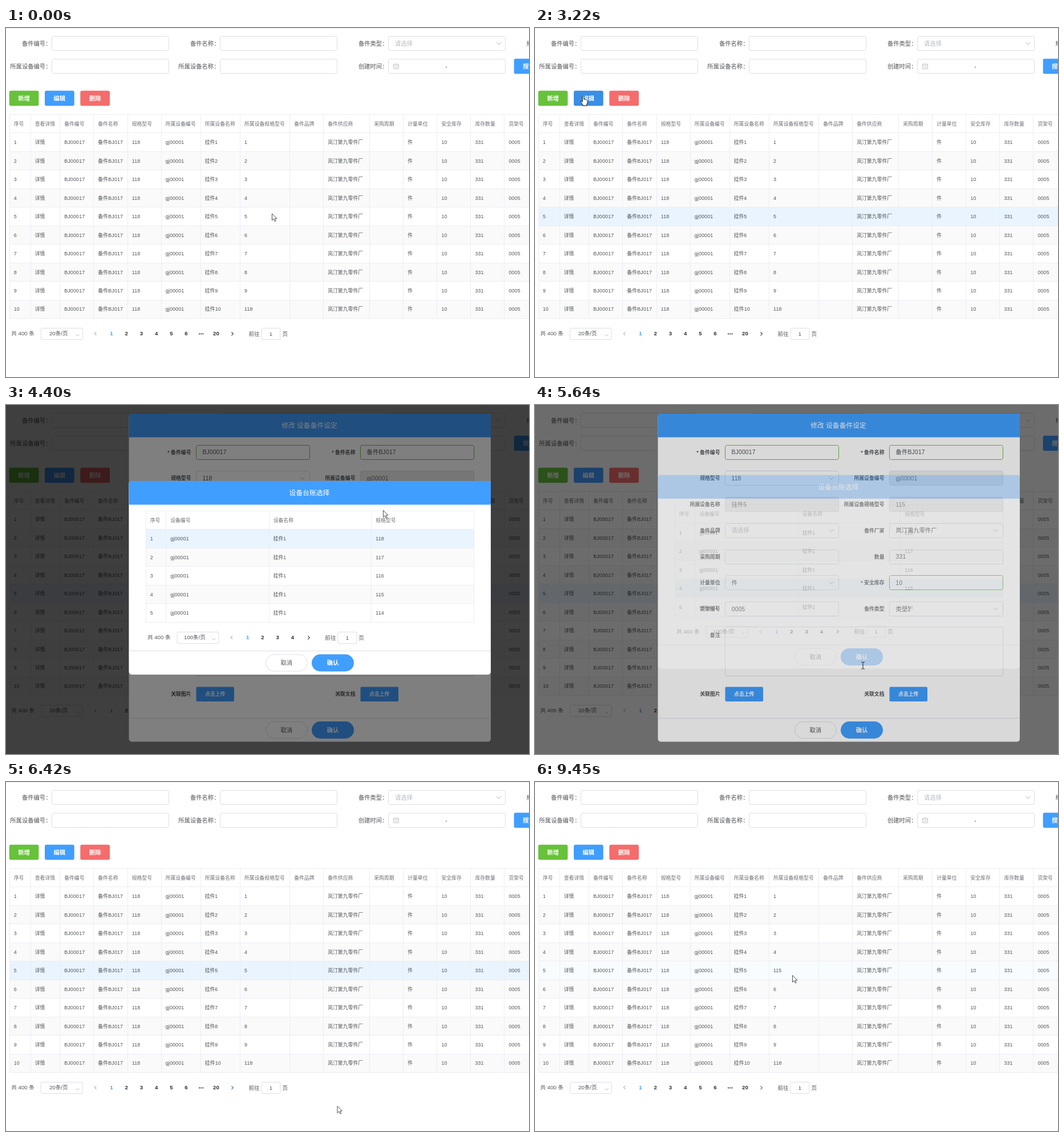
Write an HTML page that moves like this. It is 917 by 611 pixels and loops after 9830 ms.

```html
<!DOCTYPE html>
<html lang="zh-CN">
<head>
<meta charset="utf-8">
<style>
html, body { margin: 0; width: 100%; height: 100%; overflow: hidden; background: #fff; }
svg { display: block; width: 917px; height: 611px; font-family: "Liberation Sans", "Noto Sans CJK SC", "Noto Sans CJK", sans-serif; }
text { white-space: pre; }
</style>
</head>
<body>
<svg id="stage" viewBox="0 0 917 611"></svg>
<script>
const LOOP = 9830;
const BLUE = '#409eff', GREEN = '#67c23a', RED = '#f56c6c', BORDER = '#dcdfe6', LINE = '#ebeef5';
const INK = '#525458', DARK = '#303133', HINT = '#b4b8c0', PICKED = '#e9f4fe';
const SMALL = 8.85, PAGER = 9.6, BODY = 10.32, TITLE = 11.8, ROW = 32.45;
const SUPPLIER = '岚汀第九零件厂';

// Text is placed by its vertical centre; Latin runs are set slightly wider.
const text = (s, x, y, size = BODY, fill = INK, anchor = 'start', extra = '') => {
  const spacing = size !== PAGER && /\w\w/.test(s) ? 'letter-spacing=".02em"' : '';
  return `<text x="${x}" y="${y + size * 0.36}" font-size="${size}" fill="${fill}" text-anchor="${anchor}" ${spacing} ${extra}>${s}</text>`;
};
const box = (x, y, w, h, fill, stroke = 'none', r = 0, extra = '') =>
  `<rect x="${x}" y="${y}" width="${w}" height="${h}" rx="${r}" fill="${fill}" stroke="${stroke}" ${extra}/>`;
const stroke = (d, color, extra = '') => `<path d="${d}" fill="none" stroke="${color}" ${extra}/>`;
const button = (s, x, y, w, h, fill, r = 3, size = BODY, extra = '') =>
  box(x, y, w, h, fill, 'none', r, extra) + text(s, x + w / 2, y + h / 2, size, '#fff', 'middle', 'font-weight="bold"');
const chevron = (x, y, size = 4) => stroke(`M${x - size} ${y - size / 2}l${size} ${size}l${size} ${-size}`, HINT);
const snap = v => Math.floor(v) + 0.5;

function grid(xs, top, right, header, rows, fills) {
  const bottom = top + ROW * (rows.length + 1);
  let out = '';
  rows.forEach((_, i) => {
    const y = top + ROW * (i + 1);
    if (i % 2) out += box(xs[0], y, right - xs[0], ROW, '#fafafa');
    if (fills[i]) out += box(xs[0], y, right - xs[0], ROW, PICKED, 'none', 0, `id="${fills[i]}"`);
  });
  for (let i = 0; i <= rows.length + 1; i++) out += stroke(`M${xs[0]} ${snap(top + ROW * i)}H${right}`, LINE);
  for (const x of [...xs, right]) out += stroke(`M${snap(x)} ${top}V${bottom}`, LINE);
  [header, ...rows].forEach((cells, r) => cells.forEach((cell, c) => {
    const id = r === 5 && c === 7 ? 'id="cell"' : '';
    out += text(cell, xs[c] + 7.7, top + ROW * (r + 0.5), SMALL, r ? INK : '#6c6f75', 'start', id);
  }));
  return out;
}

function pager(x, y, size, pages, nextId) {
  let out = text('共 400 条', x, y, PAGER) + box(x + 52, snap(y - 9.5), 73, 20, '#fff', BORDER, 2)
    + text(size, x + 83, y, PAGER, INK, 'middle') + chevron(x + 116.5, y + 3, 2.8)
    + stroke(`M${x + 149} ${y - 3}l-3 3l3 3`, HINT, 'stroke-width="1.1"');
  pages.forEach((p, i) => {
    const px = x + 175.7 + i * 26.2;
    if (p === '…') for (const d of [-3.2, 0, 3.2]) out += `<circle cx="${px + d}" cy="${y + 0.5}" r="1.1" fill="${DARK}"/>`;
    else out += text(p, px, y, PAGER, i ? DARK : BLUE, 'middle', 'font-weight="bold"');
  });
  const end = x + 175.7 + (pages.length - 1) * 26.2 + 28.5;
  return out + stroke(`M${end - 1.5} ${y - 2.7}l3 3l-3 3`, DARK, `stroke-width="1.1" id="${nextId}"`)
    + text('前往', end + 28.5, y + 0.5, PAGER) + box(end + 51, snap(y - 9.5), 33, 20, '#fff', BORDER, 2)
    + text('1', end + 67.5, y + 0.5, PAGER, INK, 'middle') + text('页', end + 87.5, y + 0.5, PAGER);
}

function page() {
  let out = box(0, 0, 917, 611, '#fff') + box(0, 0, 917, 1, '#eee');
  const filters = [['备件编号', '所属设备编号'], ['备件名称', '所属设备名称'], ['备件类型', '创建时间']];
  filters.forEach((pair, c) => pair.forEach((label, r) => {
    const x = 80 + c * 295, y = 27 + r * 40.5;
    out += text(label + '：', x - 0.5, y, BODY, INK, 'end') + box(x + 0.5, snap(y - 13), 205, 25, '#fff', BORDER, 3);
  }));
  out += text('请选择', 682, 27, BODY, HINT) + chevron(864, 27) + text('规格型号：', 912.5, 27)
    + stroke('M679.5 63.5h9v8h-9zM679.5 66h9M682 62v2M686 62v2M681 69h6', HINT, 'stroke-width=".8"')
    + text('-', 772, 67.5, BODY, INK, 'middle') + button('搜索', 890.7, 53.7, 51.7, 26.6, BLUE);
  [['新增', GREEN, 'add'], ['编辑', BLUE, 'edit'], ['删除', RED, 'remove']].forEach(([s, color, id], i) => {
    out += button(s, 5.7 + i * 62.3, 109.7, 51.7, 26.6, color, 3, BODY, `id="${id}"`);
  });
  const header = ['序号', '查看详情', '备件编号', '备件名称', '规格型号', '所属设备编号', '所属设备名称', '所属设备规格型号',
    '备件品牌', '备件供应商', '采购周期', '计量单位', '安全库存', '库存数量', '货架号'];
  const rows = Array.from({ length: 10 }, (_, i) => [i + 1, '详情', 'BJ00017', '备件BJ017', '118', 'gj00001', '挂件' + (i + 1),
    i < 9 ? i + 1 : 118, '', SUPPLIER, '', '件', '10', '331', '0005']);
  const xs = [6, 43, 94.5, 153.5, 213, 272, 341, 410.3, 497.5, 556.5, 637.5, 696.5, 755.7, 814.7, 873.7];
  return out + grid(xs, 151.5, 933, header, rows, { 4: 'row' })
    + pager(9.3, 535, '20条/页', [1, 2, 3, 4, 5, 6, '…', 20], 'next');
}

function dialog(title, top, bottom, content) {
  const foot = bottom - 41.5;
  return box(215.5, top, 634.5, bottom - top, '#fff', 'none', 5)
    + `<path d="M215.5 ${top + 41.5}v-36.5q0-5 5-5h624.5q5 0 5 5v36.5z" fill="${BLUE}"/>`
    + text(title, 532, top + 21, TITLE, '#fff', 'middle') + content
    + stroke(`M215.5 ${snap(foot)}h634.5`, BORDER)
    + box(455.5, foot + 6.5, 73, 29, '#fff', BORDER, 14.5) + text('取消', 491.7, foot + 21, BODY, INK, 'middle')
    + button('确认', 536, foot + 6, 74, 30, BLUE, 15);
}

function form() {
  // Kinds: v = valid, s = select, d = disabled, p = placeholder select
  const fields = [
    ['* 备件编号', 'BJ00017', 'v'], ['* 备件名称', '备件BJ017', 'v'],
    ['规格型号', '118', 's'], ['所属设备编号', 'gj00001', 'd'],
    ['所属设备名称', '挂件5', 'd'], ['所属设备规格型号', '5', 'd', 'spec'],
    ['备件品牌', '请选择', 'p'], ['备件厂家', SUPPLIER, 's'],
    ['采购周期', ''], ['数量', '331'],
    ['计量单位', '件', 's'], ['* 安全库存', '10', 'v'],
    ['货架编号', '0005'], ['备件类型', '类型2', 's']];
  const label = (s, x, y) => text(s, x - 9, y, SMALL, INK, 'end', 'font-weight="bold"');
  let out = '';
  fields.forEach(([name, value, kind, id], i) => {
    const x = 333.5 + (i % 2) * 288, y = 82.5 + (i >> 1) * 45.75;
    out += label(name, x, y)
      + box(x, snap(y - 12.5), 199, 25, kind === 'd' ? '#eee' : '#fff', kind === 'v' ? GREEN : BORDER, 3, id ? `id="${id}Box"` : '')
      + text(value, x + 11, y, BODY, kind === 'p' ? HINT : kind === 'd' ? '#707276' : INK, 'start', id ? `id="${id}"` : '');
    if (kind === 's' || kind === 'p') out += chevron(x + 186, y);
  });
  out += label('备注', 333.5, 403) + box(333.5, 388.5, 487, 86, '#fff', BORDER, 3);
  ['关联图片', '关联文档'].forEach((s, i) => {
    const x = 333.5 + i * 288;
    out += label(s, x, 505.5) + button('点击上传', x, 493.5, 66.5, 25.5, BLUE, 2, SMALL);
  });
  return dialog('修改 设备备件设定', 15, 589.5, out);
}

function picker() {
  const rows = Array.from({ length: 5 }, (_, i) => [i + 1, 'gj00001', '挂件1', 118 - i]);
  return dialog('设备台账选择', 133, 472,
    grid([245, 280.5, 461, 640.5], 185.5, 820, ['序号', '设备编号', '设备名称', '规格型号'], rows, { 0: 'pick1', 3: 'pick4' })
    + pager(248, 407, '100条/页', [1, 2, 3, 4], 'pickerNext'));
}

const layer = (id, content) => `<g id="${id}">${content}</g>`;
const mask = box(0, 0, 917, 611, '#000', 'none', 0, 'fill-opacity=".5"');
const shapes = {
  arrow: '<path d="M.5.5V12.3L3.3 9.7L5.3 14L7.2 13.1L5.3 9H9Z" fill="#fff" stroke="#222" stroke-width=".8"/>',
  hand: '<path d="M-1.3 1.2Q0-.8 1.3 1.2V6.3Q2.8 5.3 3.8 6.8Q5.2 5.9 6 7.4Q7.6 7 7.6 9V12.5L6.2 15V17.5H-.6V16L-4.2 11.2Q-4.6 9.2-2.8 9.7L-1.3 11Z" fill="#fff" stroke="#111"/>',
  beam: stroke('M-3-6H-1L0-5L1-6H3M0-5V5M-3 6H-1L0 5L1 6H3', '#222')
};
stage.innerHTML = page() + layer('mask1', mask) + layer('dialog1', form()) + layer('mask2', mask) + layer('dialog2', picker())
  + layer('cursor', Object.entries(shapes).map(([id, s]) => layer(id, s)).join(''));

// Cursor path: time, x, y
const path = [[80, 466, 324.5], [170, 463, 296], [250, 460, 303], [410, 460, 303], [740, 445, 328], [1850, 445, 328], [1890, 437, 325],
  [2000, 437, 325], [2040, 445, 328], [2200, 445, 328], [2670, 84.5, 118.5], [3400, 84.5, 118.5], [3840, 667, 173], [4320, 667, 173],
  [4400, 661, 184], [4710, 663, 347], [4840, 663, 347], [5030, 655, 326], [5150, 655, 326], [5430, 575, 450], [5700, 575, 457],
  [5800, 575, 457], [6110, 580.5, 567], [7350, 580.5, 567], [7520, 581, 564], [8100, 581, 564], [8370, 581, 556], [8520, 581, 555.5],
  [8950, 581, 555.5], [9450, 451, 338]];
const pointers = [[0, 'arrow'], [2600, 'hand'], [3460, 'arrow'], [3790, 'beam'], [4400, 'arrow'], [5380, 'hand'],
  [5620, 'beam'], [6040, 'hand'], [6340, 'arrow']];

const $ = id => document.getElementById(id);
const ramp = (t, a, b) => Math.min(1, Math.max(0, (t - a) / (b - a)));
const lastAt = (list, t) => list.filter(k => k[0] <= t).pop();
const set = (id, name, value) => $(id).setAttribute(name, value);

function cursorAt(t) {
  const i = path.findIndex(k => k[0] > t);
  if (i === 0) return path[0].slice(1);
  if (i < 0) return path[path.length - 1].slice(1);
  const [t0, x0, y0] = path[i - 1], [t1, x1, y1] = path[i];
  const u = ramp(t, t0, t1), e = u * u * (3 - 2 * u);
  return [x0 + (x1 - x0) * e, y0 + (y1 - y0) * e];
}

function show(id, opacity, shift = 0) {
  set(id, 'opacity', opacity);
  set(id, 'visibility', opacity > 0 ? 'visible' : 'hidden');
  set(id, 'transform', `translate(0 ${shift})`);
}

function draw(t) {
  const open = ramp(t, 3290, 3520), close = ramp(t, 6190, 6400);
  show('mask1', open - close);
  show('dialog1', open - close, -15 * (1 - open + close));
  const pickerClose = ramp(t, 5500, 5700), picking = t >= 4400 ? 1 - pickerClose : 0;
  show('mask2', picking);
  show('dialog2', picking, -15 * pickerClose);

  set('row', 'fill-opacity', ramp(t, 80, 250) - 0.7 * ramp(t, 9000, 9400));
  set('pick1', 'fill-opacity', t < 5180 ? 1 : 0);
  set('pick4', 'fill-opacity', t < 5180 ? 0 : 1);
  set('edit', 'fill', t < 2600 || t > 3460 ? BLUE : t < 3000 ? '#66b1ff' : '#3a8ee6');
  set('next', 'stroke', t < 6190 ? DARK : '#2f6ba6');
  set('specBox', 'stroke', t >= 4240 && t < 5500 ? '#a0c8f0' : BORDER);
  $('spec').textContent = t < 5500 ? 5 : 115;
  $('cell').textContent = t < 9000 ? 5 : 115;

  set('cursor', 'transform', `translate(${cursorAt(t).join(' ')})`);
  const pointer = lastAt(pointers, t)[1];
  for (const id in shapes) set(id, 'visibility', id === pointer ? 'visible' : 'hidden');
}

const start = performance.now();
function tick() {
  draw((performance.now() - start) % LOOP);
  requestAnimationFrame(tick);
}
tick();
</script>
</body>
</html>
```
